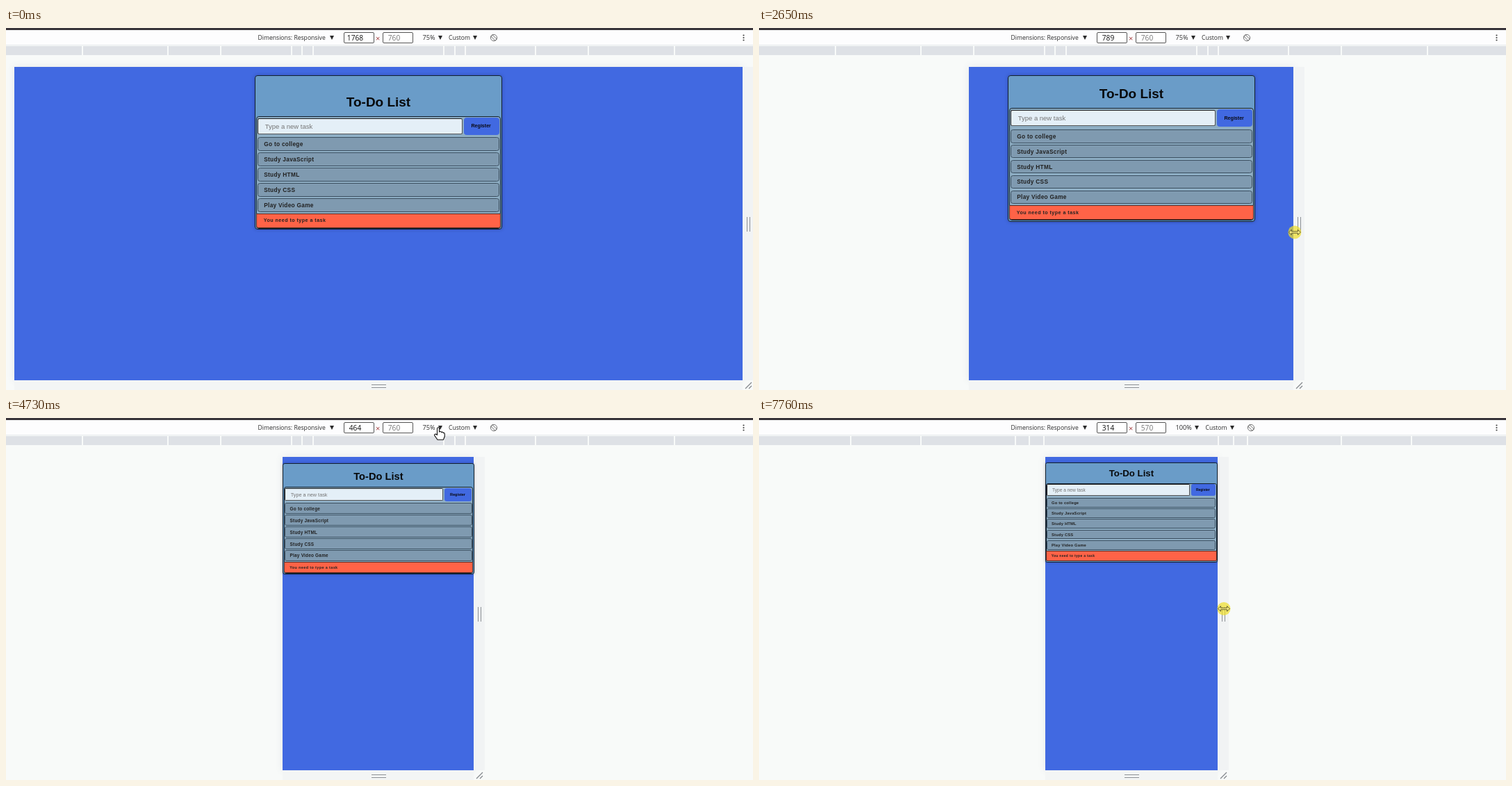
Recreate the animation shown at these times as an HTML page. Size 1075 by 521 pixels, loop 8 s.

```html
<!DOCTYPE html>
<html lang="en">
<head>
<meta charset="utf-8">
<title>To-Do List</title>
<style>
* { box-sizing: border-box; }
html, body { margin: 0; width: 100%; height: 100%; overflow: hidden; }
body { position: relative; background: #f8faf9; color: #2b2b2b; font: 9.2px/14px "Open Sans", "Noto Sans", sans-serif; }
body * { position: absolute; white-space: nowrap; }
#bar { left: 0; top: 0; width: 100%; height: 25px; background: #fdfdfe; border-top: 3px solid #38343a; border-bottom: 1px solid #e8eaed; }
#bar * { top: 4px; }
#bar .label { font-size: 8.6px; }
#bar .field { top: 3px; width: 44px; height: 16px; padding-right: 11px; border: 1px solid #555; border-radius: 2px; background: #fff; color: #777; font-size: 10.2px; line-height: 14px; text-align: center; }
.tri { border: 3px solid transparent; border-top: 6px solid #2b2b2b; border-bottom: 0; margin-top: 4px; }
#ruler { left: 0; top: 26px; width: 100%; height: 13px; background: #dee1e6; }
#ruler i { top: 0; width: 2px; height: 13px; background: #f8faf9; }
#view { top: 56px; height: 450.5px; background: #4169e1; box-shadow: 0 0 10px rgba(90, 100, 120, .13); }
#side { left: 100%; top: 0; width: 16px; height: 100%; background: #f1f3f4; }
#foot { left: 0; top: 100%; width: 100%; height: 15px; background: #f3f5f5; }
#grip { left: 6px; top: 216px; width: 5px; height: 21px; border: solid #8d9196; border-width: 0 1px; }
#base { left: 526px; top: 513px; width: 21px; height: 5px; border: solid #8d9196; border-width: 1px 0; }
#corner { left: calc(100% + 3px); top: 453px; width: 11px; height: 11px; }
svg { overflow: visible; }

/* card: 1em is 10 units of its full-width layout */
#card { left: 50%; margin-left: -17.8em; width: 35.65em; border: 1px solid #12202e; border-radius: .4em; background: #6a9cc8; box-shadow: 0 0 .5em rgba(0, 0, 40, .25); font-family: "Liberation Sans", Arial, sans-serif; line-height: normal; color: #222; }
#card > *, #list > * { margin: -1px; }
#card span { position: static; }
#title, .box { display: flex; align-items: center; }
#title { left: 0; right: 0; height: 2.1em; justify-content: center; color: #080a0c; }
#title span { font-size: 1.897em; font-weight: bold; }
#list { left: .2em; right: .2em; height: 16.15em; border: 1px solid #12202e; border-radius: .4em; background: #8eaec4; }
.box { border: 1px solid #3c5061; border-radius: .35em; font-weight: bold; }
.box span { margin-left: -1px; }
#input { left: .2em; top: .25em; width: 29.5em; height: 2.35em; padding-left: 1.1em; background: #e4eff7; border-color: #222 #555 #555 #222; border-radius: .25em; font-weight: normal; }
#input span { font-size: .948em; color: #757575; }
#button { left: 29.9em; top: .2em; width: 5.1em; height: 2.45em; justify-content: center; background: #4169e1; border-color: #4169e1; }
#button span { font-size: .711em; color: #0a0a14; }
.task { left: .2em; width: 34.85em; height: 1.98em; padding-left: .95em; background: #7f9ab0; }
.task span { font-size: .83em; letter-spacing: .036em; }
#warn { left: 0; right: 0; top: 13.98em; height: 2.1em; padding-left: 1.1em; background: #ff6347; border-radius: 0 0 .3em .3em; border-color: #5a2a22; }
#warn span { font-size: .711em; letter-spacing: .067em; }

#menu { left: 597px; top: 25px; width: 120px; height: 127px; background: #fff; border: 1px solid #c4c7cb; box-shadow: 1px 1px 3px rgba(0, 0, 0, .25); }
#menu div { left: 2px; width: 114px; height: 15.5px; line-height: 15px; padding-left: 18px; }
#menu hr { left: 2px; top: 102px; width: 114px; margin: 0; border: 0; border-top: 1px solid #ddd; }
#cursor { left: 0; top: 0; width: 1px; height: 1px; }
</style>
</head>
<body>
<div id="bar">
  <span class="label" style="left:362.5px">Dimensions: Responsive</span><i class="tri" style="left:466px"></i>
  <span class="field" id="wide" style="left:486px;color:#111"></span>
  <span style="left:532px;top:5px;color:#a33a3a;font-size:11px">×</span>
  <span class="field" id="high" style="left:542px"></span>
  <span id="zoom" style="left:599.5px"></span><i class="tri" id="zoomTri"></i>
  <div id="after">
    <span class="label" style="left:637px;top:0">Custom</span><i class="tri" style="left:672px;top:0"></i>
    <svg style="left:697px;top:2px" width="10" height="10" fill="none" stroke="#666" stroke-width=".9"><circle cx="5" cy="5" r="4.6"/><rect x="3.4" y=".6" width="3.2" height="8.8" transform="rotate(-45 5 5)"/></svg>
  </div>
  <svg style="left:1060px;top:6px" width="3" height="10" fill="#444"><circle cx="1.5" cy="1.5" r="1.1"/><circle cx="1.5" cy="5" r="1.1"/><circle cx="1.5" cy="8.5" r="1.1"/></svg>
</div>
<div id="ruler"></div>
<div id="view">
  <div id="side"><i id="grip"></i></div>
  <div id="foot"></div>
  <svg id="corner" stroke="#85898e" stroke-width="1.3"><path d="M1 10L10 1M6 10L10 6"/></svg>
  <div id="card">
    <div id="title"><span>To-Do List</span></div>
    <div id="list">
      <div class="box" id="input"><span>Type a new task</span></div>
      <div class="box" id="button"><span>Register</span></div>
      <div class="box" id="warn"><span>You need to type a task</span></div>
    </div>
  </div>
</div>
<i id="base"></i>
<div id="menu"><hr></div>
<svg id="cursor">
  <g id="resize">
    <circle id="press" r="9.5" fill="#f0de28" fill-opacity=".7"/>
    <path d="M-8.5 0L-4.5 -3.7V-1.2H4.5V-3.7L8.5 0L4.5 3.7V1.2H-4.5V3.7Z" fill="#f6ea80" stroke="#45401c" stroke-width=".8"/>
  </g>
  <path id="arrow" d="M0 0V17L4 13L6.5 19L9 18L6.5 12H12Z" fill="#fff" stroke="#111"/>
  <path id="hand" d="M-1.5 11V1.5Q0 -1 1.5 1.5V6.5Q3.5 5 4.5 7.3Q6.5 6 7.3 8.3Q9 7.5 9.3 9.5V13L7.5 18H-1L-5.5 11.5Q-5.3 8.5 -1.5 11Z" fill="#fff" stroke="#111" stroke-width="1.1"/>
  <g id="touch"><circle r="8.3" fill="#333" fill-opacity=".35"/><circle r="6.5" fill="#333" fill-opacity=".6"/></g>
</svg>
<script>
const LOOP = 8000, MID = 535.75, PX = 0.7903;
const ZOOM_AT = 6130, MENU_AT = 4930;
const $ = id => document.getElementById(id);

// [time, CSS width of the emulated screen]
const WIDTHS = [[1040, 1768], [1360, 1555], [1840, 1134], [2180, 960], [2650, 789], [3190, 616],
  [3470, 557], [3800, 464], [6960, 464], [7760, 314]];
// [time, x, y] of the pointer
const POINTER = [[70, 1068, 279], [280, 1067, 282], [880, 1053, 283], [1040, 1050, 283], [1360, 997, 283],
  [1840, 873, 288], [2180, 820, 294], [2650, 771, 294], [3190, 720.5, 294], [3470, 703, 294],
  [3800, 682, 290], [4020, 880, 190], [4330, 640, 40], [4500, 622, 13], [5270, 622, 14],
  [5540, 626, 80], [5930, 625, 78], [6130, 625, 78], [6470, 699, 208], [6870, 728, 281],
  [6960, 728, 280], [7760, 669, 274.5]];

function at(keys, t, n = 1) {
  const i = keys.findIndex(k => k[0] > t);
  if (i === 0) return keys[0][n];
  if (i < 0) return keys[keys.length - 1][n];
  const a = keys[i - 1], b = keys[i];
  return a[n] + (b[n] - a[n]) * (t - a[0]) / (b[0] - a[0]);
}

function add(parent, tag, css, html = "") {
  const el = document.createElement(tag);
  el.style.cssText = css;
  el.innerHTML = html;
  return parent.appendChild(el);
}

["Go to college", "Study JavaScript", "Study HTML", "Study CSS", "Play Video Game"].forEach((text, i) => {
  add($("list"), "div", `top:${3.03 + i * 2.195}em`, `<span>${text}</span>`).className = "box task";
});

const items = ["Fit to window (75%)", "50%", "75%", "100%", "125%", "150%", "Auto-adjust zoom"].map((text, i) =>
  add($("menu"), "div", `top:${5 + i * 15.5 + (i > 5 ? 7 : 0)}px`, text));

const ticks = [320, 375, 425, 768, 1024, 1440].flatMap(size =>
  [-1, 1].map(side => ({ offset: side * size / 2, inset: side > 0 ? 2 : 0, el: add($("ruler"), "i", "") })));

const show = (id, on) => { $(id).style.display = on ? "" : "none"; };
const put = (id, text) => { if ($(id).textContent !== text) $(id).textContent = text; };

// Returns the right edge of the emulated screen.
function drawScreen(t) {
  const zoom = t < ZOOM_AT ? 0.75 : 1, scale = PX * zoom;
  const css = at(WIDTHS, t), width = css * scale;
  const k = Math.min(css, 600) * scale / 355.7;
  const head = 3.85 + css * 0.00118;

  const view = $("view").style, card = $("card").style;
  view.left = MID - width / 2 + "px";
  view.width = width + "px";
  card.fontSize = 10 * k + "px";
  card.top = 12 * k + "px";
  card.height = head + 16.3 + "em";
  $("title").style.top = head - 3.08 + "em";
  $("list").style.top = head - 0.03 + "em";

  put("wide", String(Math.round(css)));
  put("high", String(570 / zoom));
  put("zoom", zoom * 100 + "%");
  const shift = zoom < 1 ? 0 : 5.5;
  $("zoomTri").style.left = 621.5 + shift + "px";
  $("after").style.left = shift + "px";
  for (const { offset, inset, el } of ticks) el.style.left = Math.round(MID + offset * scale) - inset + "px";
  return MID + width / 2;
}

function drawPointer(t, right) {
  const x = at(POINTER, t, 1), y = at(POINTER, t, 2);
  const menu = t >= MENU_AT && t < ZOOM_AT;
  const drag = t >= 280 && t < 3800 || t >= 6960;
  let kind = "arrow";
  if (drag || t < 280 || t > 6500 && x >= right) kind = "resize";
  else if (!menu && y < 26) kind = "hand";
  else if (!menu && y > 56 && x < right && x > 2 * MID - right) kind = "touch";

  for (const id of ["resize", "arrow", "hand", "touch"]) show(id, id === kind);
  show("press", drag);
  show("cursor", t >= 70);
  show("menu", menu);
  $("cursor").style.transform = `translate(${x}px, ${y}px)`;
  const hover = Math.floor((y - 31) / 15.5);
  items.forEach((el, i) => { el.style.background = i === hover ? "#e3e5e8" : ""; });
}

function frame(now) {
  const t = now % LOOP;
  drawPointer(t, drawScreen(t));
  requestAnimationFrame(frame);
}
frame(performance.now());
</script>
</body>
</html>
```
